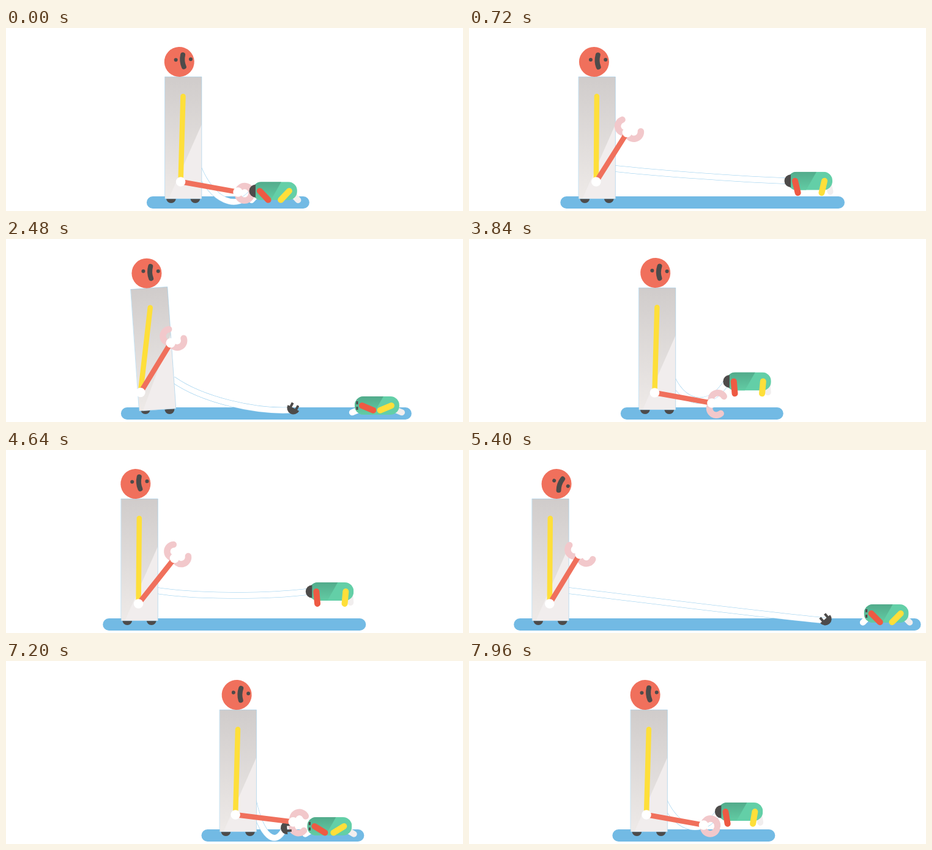
Animation of 747x300 px, one loop 8000 ms. Source, as an HTML page with a canvas:

```html
<!DOCTYPE html>
<html lang="en">
<head>
<meta charset="utf-8">
<title>Robot and runaway dog</title>
<style>
html, body { margin: 0; width: 100%; height: 100%; overflow: hidden; background: #fff; }
canvas { display: block; width: 747px; height: 300px; }
</style>
</head>
<body>
<canvas id="stage" width="747" height="300"></canvas>
<script>
const g = document.getElementById('stage').getContext('2d');
const RAD = Math.PI / 180;
const DARK = '#4d4b4a', CORAL = '#f0705c', YELLOW = '#fedf3a', PINK = '#f2c8cb', EDGE = '#8dc9ec';

// The camera pans right by one full journey per loop
const LOOP = 4000, JOURNEY = 447.6;
const UNPLUG = 1040, REPLUG = 3600, LEAP = 3745;
const RUN = 361, HOP = 250;

const clamp = u => Math.min(1, Math.max(0, u));

function ramp(t, from, to) {
  const u = clamp((t - from) / (to - from));
  return u * u * (3 - 2 * u);
}

const polar = ([x, y], turn, r) => [x + r * Math.cos(turn * RAD), y + r * Math.sin(turn * RAD)];

function robotPose(t, pan) {
  const go = (from, to) => ramp(t, from, to);
  const x = 260 + 235.5 * go(2030, 2440) + (JOURNEY - 235.5) * go(2560, 2880) - pan;
  const lean = -4 * (go(2030, 2300) - go(2600, 2880));
  const roll = -2.4 + 24.2 * go(600, 1200) - 17.8 * go(1700, 2400) - 6.4 * go(3780, LOOP);
  const upper = 1.6 - 1.2 * go(0, 800) + 6.1 * go(1900, 2400) - 4.9 * go(2640, 3100);
  const fore = 10.3 - 69 * (go(160, 760) - go(2800, 3260));
  const pinch = go(3150, 3320) - go(REPLUG, 3760);
  const claw = 3 + 77 * go(160, 1100) - 41 * go(1700, 2300) - 34 * pinch - 36 * go(3840, 3990);
  const shoulder = polar([x + 30, 280], lean - 90.15, 168);
  const elbow = polar(shoulder, 90 + upper, 140);
  return { x, lean, roll, fore, claw, shoulder, elbow, hand: polar(elbow, fore, 95) };
}

// Hops away, slides to a halt, then goes limp until plugged in again
function dogPose(t, pan) {
  const run = RUN * clamp(t / UNPLUG) ** 1.63;
  const slide = (JOURNEY - RUN) * (1 - (1 - clamp((t - UNPLUG) / 2340)) ** 3.5);
  const hopping = t < 4 * HOP || t > LEAP;
  let air = 0, legs = 45 + 22 * (ramp(t, 1500, 2480) - ramp(t, 2900, REPLUG));
  if (hopping) {
    const u = t < LEAP ? t % HOP / HOP : (t - LEAP) / (LOOP - LEAP);
    air = 128 * u * (1 - u);
    legs = 5 + 40 * (1 - air / 32) ** 3;
  }
  return { x: 403 + run + slide - pan, y: 264.2 - 15.8 * Math.cos(legs * RAD) - air, legs };
}

function plugPose(t, pan, dog) {
  if (t < UNPLUG || t >= REPLUG) return { at: [dog.x + 5, dog.y + 15], turn: 0, plugged: true };
  const fling = ramp(t, UNPLUG, 1300);
  const x = 769 - 30 * fling + 8.5 * ramp(t, 1900, 2480) + 108 * ramp(t, 2600, REPLUG) - pan;
  const y = 268 + 9 * (fling - ramp(t, 2900, REPLUG)) - 16 * Math.sin(Math.PI * fling);
  const turn = -130 * fling + 68 * ramp(t, 1500, 2480) + 62 * ramp(t, 2700, 3300);
  return { at: [x, y], turn, plugged: false };
}

function placed([x, y], turn, draw) {
  g.save();
  g.translate(x, y);
  g.rotate(turn * RAD);
  draw();
  g.restore();
}

function disc([x, y], r, fill) {
  g.fillStyle = fill;
  g.beginPath();
  g.arc(x, y, r, 0, 7);
  g.fill();
}

function stroke(width, color, cap = 'round') {
  g.lineWidth = width;
  g.strokeStyle = color;
  g.lineCap = cap;
  g.stroke();
}

function bar(from, to, width, color) {
  g.beginPath();
  g.moveTo(...from);
  g.lineTo(...to);
  stroke(width, color);
}

function poly(points, fill) {
  g.fillStyle = fill;
  g.beginPath();
  points.forEach(p => g.lineTo(...p));
  g.fill();
}

function fade(y0, y1, top, bottom) {
  const f = g.createLinearGradient(0, y0, 0, y1);
  f.addColorStop(0, top);
  f.addColorStop(1, bottom);
  return f;
}

function drawFloor(left, right) {
  g.fillStyle = '#72bae4';
  g.beginPath();
  g.roundRect(left, 276, right - left, 20, 10);
  g.fill();
}

function drawLeg(hip, turn, length, color) {
  bar(hip, polar(hip, 90 + turn, length), 10, color);
}

function drawHindLegs({ x, y, legs }) {
  drawLeg([x + 6, y + 22], legs, 11, '#fff');
  drawLeg([x + 67, y + 22], -legs, 11, '#f1eeee');
}

function drawFrontLegs({ x, y, legs }) {
  drawLeg([x + 12, y + 15], -legs, 20, '#ee5a43');
  drawLeg([x + 60, y + 15], legs, 20, YELLOW);
}

function drawDog({ x, y }, plugged) {
  placed([x, y], 0, () => {
    g.beginPath();
    g.roundRect(0, 0, 73, 30, 14.5);
    g.clip();
    g.fillStyle = '#63cfa7';
    g.fillRect(0, 0, 73, 30);
    poly([[0, 0], [47, 0], [30, 30], [0, 30]], fade(0, 30, '#52ab8b', '#62cca4'));
    if (plugged) return;
    g.fillStyle = DARK;
    for (const slot of [8, 17]) g.fillRect(2.5, slot, 3, 5);
  });
}

// Hangs lower as its ends come closer
function drawRope([x, y], [x2, y2]) {
  const dx = x2 - x, dy = y2 - y;
  const sag = Math.max(0, 45 - Math.max(0, dx - 85) * .21);
  const ground = dx > 130 ? 284 : 320;
  g.beginPath();
  g.moveTo(x, y);
  g.bezierCurveTo(x + dx * .25, y + dy * .25 + sag, x + dx * .7, Math.min(ground, y + dy * .75 + sag), x2, y2);
  stroke(10.4, EDGE, 'butt');
  stroke(9.4, '#fff', 'butt');
}

function drawPlug({ at, turn, plugged }) {
  placed(at, turn, () => {
    g.fillStyle = DARK;
    g.beginPath();
    g.arc(0, 0, 10.5, Math.PI / 2, Math.PI * 1.5);
    g.fill();
    if (plugged) return;
    for (const side of [-7, 3]) g.fillRect(-1, side, 8, 4);
  });
}

function drawClaw({ hand, fore, claw }) {
  for (const side of [-1, 1]) {
    placed(hand, fore + side * claw, () => {
      g.beginPath();
      g.arc(11.3, 0, 11.3, Math.PI, 0, side > 0);
      stroke(10.5, PINK);
    });
  }
}

function drawHead() {
  disc([0, 0], 24.5, CORAL);
  disc([-5.5, -3.5], 3, DARK);
  disc([18.8, -3.5], 3, DARK);
  g.beginPath();
  g.moveTo(6.3, -11.3);
  g.quadraticCurveTo(3.5, -1, 7.2, 8.5);
  stroke(8, DARK);
}

function drawBody({ x, lean, roll }) {
  disc([x + 10, 279], 8, DARK);
  disc([x + 49.5, 279], 8, DARK);
  placed([x + 30, 280], lean, () => {
    g.fillStyle = fade(-200, 0, '#d0cccb', '#eeeae8');
    g.fillRect(-30, -200, 60, 200);
    poly([[30, -122], [30, 0], [-24, 0]], '#f1eded');
    g.beginPath();
    g.rect(-30, -200, 60, 200);
    stroke(.5, EDGE);
    placed([.68 * roll - 5, -224.5], roll, drawHead);
  });
}

function drawArm({ shoulder, elbow, hand }) {
  bar(shoulder, elbow, 8.5, YELLOW);
  bar(elbow, hand, 8.5, CORAL);
  disc(elbow, 7.8, '#fff');
  disc(hand, 7.8, '#fff');
}

function render(t) {
  const pan = JOURNEY * t / LOOP;
  const robot = robotPose(t, pan);
  const dog = dogPose(t, pan);
  const plug = plugPose(t, pan, dog);

  g.fillStyle = '#fff';
  g.fillRect(0, 0, 747, 300);
  drawFloor(robot.x - 30, dog.x + 93);
  drawHindLegs(dog);
  drawRope([robot.x + 55, 230], polar(plug.at, plug.turn + 180, 4));
  drawBody(robot);
  drawClaw(robot);
  drawDog(dog, plug.plugged);
  drawPlug(plug);
  drawFrontLegs(dog);
  drawArm(robot);
}

const start = performance.now();
function tick() {
  render((performance.now() - start) % LOOP);
  requestAnimationFrame(tick);
}
tick();
</script>
</body>
</html>
```
